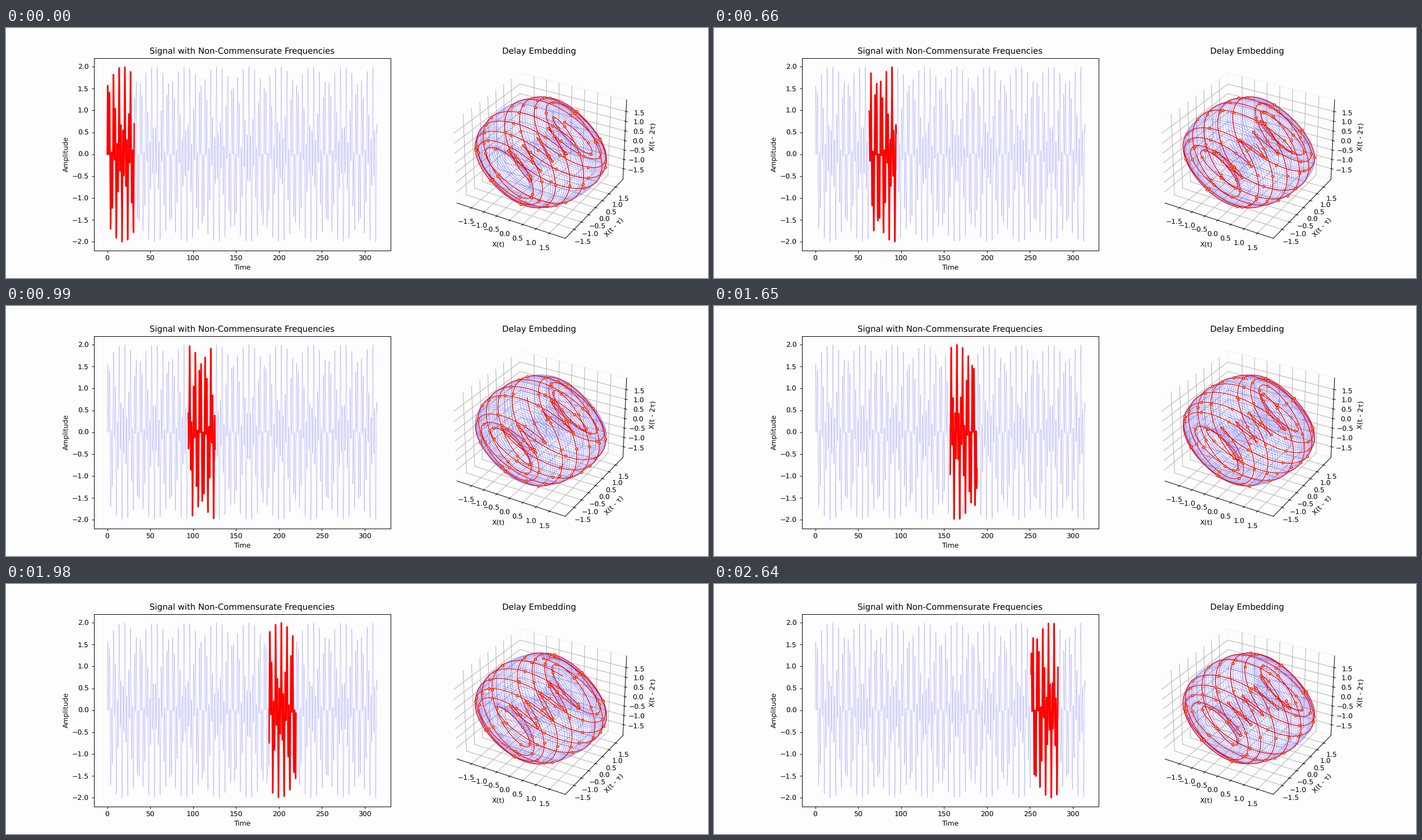
Write a matplotlib script that moves like this. It is 1252 px wide and 447 px high and loops after 2.97 s.

```python
import numpy as np
import matplotlib.pyplot as plt
from matplotlib.animation import FuncAnimation

W, H = 1252, 447
DPI = W / 14
N, WINDOW, LAG, FRAMES = 10000, 1000, 20, 9
PAPER = "#fdfdfd"

plt.rcParams.update({"font.family": "DejaVu Sans", "text.hinting": "none",
                     "figure.facecolor": PAPER, "axes.facecolor": PAPER})

# Two sines whose frequency ratio is irrational
t = np.linspace(0, 100 * np.pi, N)
signal = np.sin(t) + np.sin(2 * np.sqrt(2) * t)
embedded = np.array([signal[:-2 * LAG], signal[LAG:-LAG], signal[2 * LAG:]])

fig = plt.figure(figsize=(W / DPI, H / DPI), dpi=DPI)
grid = fig.add_gridspec(1, 2, width_ratios=[3, 2])
thin = dict(color="blue", lw=0.5, alpha=0.3)

ax = fig.add_subplot(grid[0])
ax.plot(t, signal, **thin)
trace, = ax.plot(t[:WINDOW], signal[:WINDOW], color="red", lw=2)
ax.set(title="Signal with Non-Commensurate Frequencies",
       xlabel="Time", ylabel="Amplitude")

ax3 = fig.add_subplot(grid[1], projection="3d")
ax3.plot(*embedded, **thin)
orbit, = ax3.plot(*embedded[:, :WINDOW], color="red", lw=1, marker="o",
                  markevery=10, ms=3.4, mfc="orange", mec="red", mew=0.8)
ticks = np.arange(-1.5, 2, 0.5)
span = 2 * 25 / 24
ax3.set(title="Delay Embedding", xlabel="X(t)", ylabel="X(t - τ)",
        zlabel="X(t - 2τ)", xticks=ticks, yticks=ticks, zticks=ticks,
        xlim=(-span, span), ylim=(-span, span), zlim=(-span, span))
for axis in (ax3.xaxis, ax3.yaxis, ax3.zaxis):
    axis.pane.set_fill(False)


def update(i):
    part = slice(i * WINDOW, (i + 1) * WINDOW)
    trace.set_data(t[part], signal[part])
    orbit.set_data_3d(*embedded[:, part])
    return trace, orbit


anim = FuncAnimation(fig, update, frames=FRAMES, interval=330,
                     repeat=True, repeat_delay=0, blit=False)
plt.show()
```
